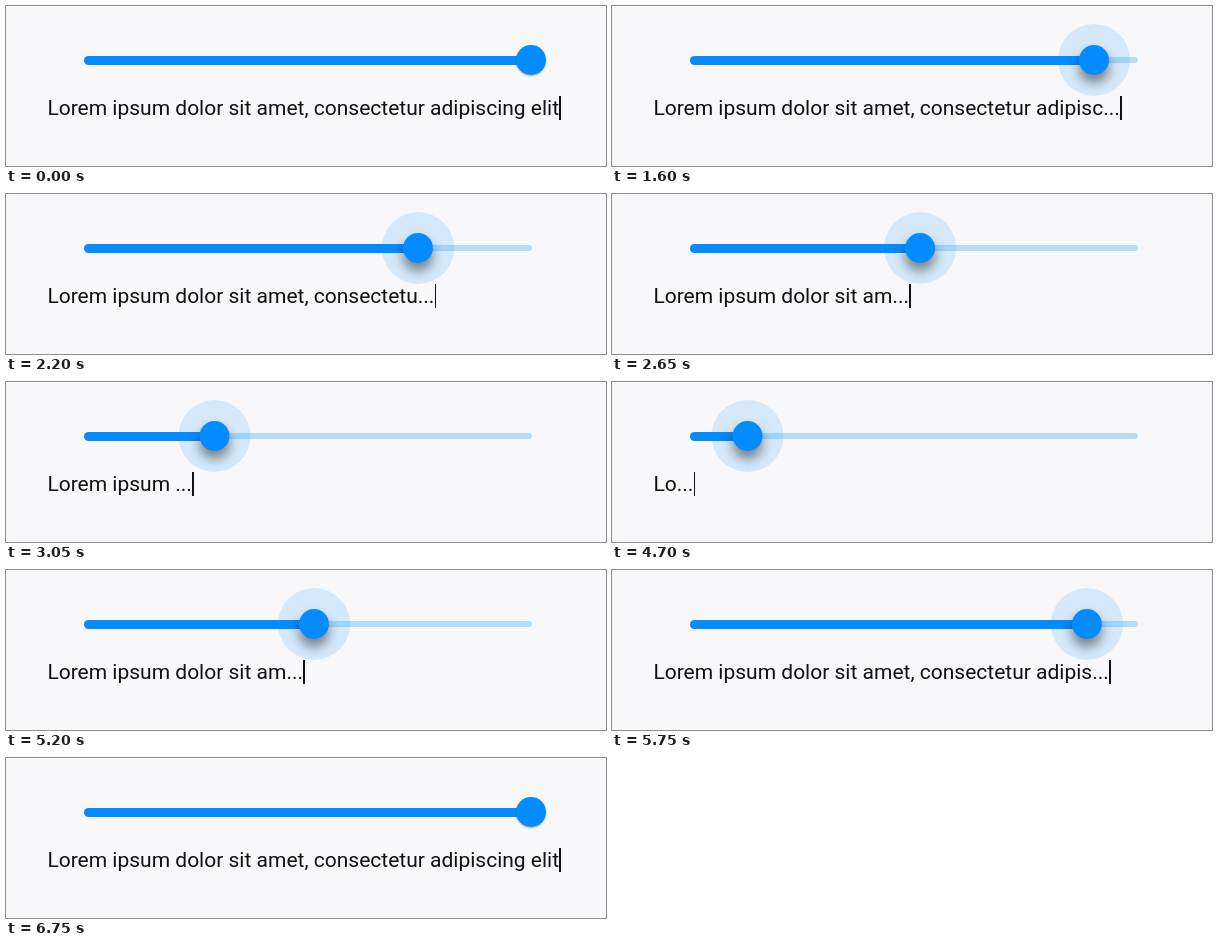
Animation, 600 px wide and 160 px high, one loop 6850 ms. Source, as an HTML page:

```html
<!DOCTYPE html>
<html lang="en">
<head>
<meta charset="utf-8">
<title>Text slider</title>
<style>
  html, body { margin: 0; width: 100%; height: 100%; overflow: hidden; background: #f8f7fa; }
  .stage { position: relative; width: 600px; height: 160px; overflow: hidden; }
  .stage > * { position: absolute; }
  .rail { left: 78px; top: 51px; width: 447.5px; height: 6px; border-radius: 3px; background: #b5ddf8; }
  .fill { left: 78px; top: 49.5px; height: 9px; border-radius: 4.5px; background: #048bff; }
  .halo, .thumb { left: 0; top: 0; border-radius: 50%; }
  .halo { width: 72px; height: 72px; margin: -36px; background: rgba(0, 150, 245, .14); }
  .thumb { width: 30.4px; height: 30.4px; margin: -15.2px; background: #048bff; }
  .line { left: 41.4px; top: 90px; height: 24px; white-space: pre; color: #111;
          font: 21px/25px Roboto, sans-serif; }
  .caret { left: 0; top: 90px; width: 1.6px; height: 24px; background: #111; }
</style>
</head>
<body>
<div class="stage">
  <div class="rail"></div>
  <div class="fill"></div>
  <div class="halo"></div>
  <div class="thumb"></div>
  <span class="line"></span>
  <div class="caret"></div>
</div>
<script>
const LOOP = 6850, STEP = 50;
const LEFT = 78, RIGHT = 525, RAIL_Y = 54;
const TEXT = 'Lorem ipsum dolor sit amet, consectetur adipiscing elit';

// [time, thumb x] for the drag out and the drag back
const dragOut = [[1150, RIGHT], [1600, 482], [2200, 412], [2350, 385], [3050, 208.5], [3760, LEFT]];
const dragBack = [[4400, LEFT], [5100, 278], [5200, 308], [5800, 488], [6050, RIGHT]];

const [fill, halo, thumb, line, caret] =
  ['fill', 'halo', 'thumb', 'line', 'caret'].map(name => document.querySelector('.' + name));

const clamp = v => Math.min(1, Math.max(0, v));
const smooth = v => v * v * (3 - 2 * v);
const ramp = (t, from, to) => smooth(clamp((t - from) / (to - from)));

// Cubic Hermite through the points, at rest on both ends
function along(points, t) {
  const last = points.length - 1;
  if (t <= points[0][0]) return points[0][1];
  if (t >= points[last][0]) return points[last][1];
  const slope = i => i === 0 || i === last ? 0 :
    (points[i + 1][1] - points[i - 1][1]) / (points[i + 1][0] - points[i - 1][0]);
  const i = points.findIndex(p => p[0] > t) - 1;
  const [t0, x0] = points[i], [t1, x1] = points[i + 1];
  const span = t1 - t0, u = (t - t0) / span;
  return x0 + (x1 - x0) * smooth(u)
    + span * u * (1 - u) * ((1 - u) * slope(i) - u * slope(i + 1));
}

function shorten(fraction) {
  const count = Math.max(0, Math.floor(57.2 * fraction - 1.6));
  if (count >= TEXT.length) return TEXT;
  return TEXT.slice(0, Math.max(0, count - 3)) + '...'.slice(0, count);
}

function draw(t) {
  const x = along(t < 4000 ? dragOut : dragBack, t);
  const press = ramp(t, 950, 1300) - ramp(t, 6150, 6600);
  const place = `translate(${x}px, ${RAIL_Y}px)`;

  fill.style.width = x - LEFT + 'px';
  halo.style.transform = `${place} scale(${press})`;
  thumb.style.transform = place;
  thumb.style.boxShadow =
    `0 ${1 + 7 * press}px ${2 + 10 * press}px rgba(0, 0, 0, ${.3 + .15 * press})`;

  line.textContent = shorten((x - LEFT) / (RIGHT - LEFT));
  const width = line.getBoundingClientRect().width;
  caret.style.left = 40.8 + width + (width ? .8 : 0) + 'px';
}

function tick() {
  const t = performance.now() % LOOP;
  draw(Math.floor(t / STEP) * STEP);
  requestAnimationFrame(tick);
}
tick();
</script>
</body>
</html>
```
